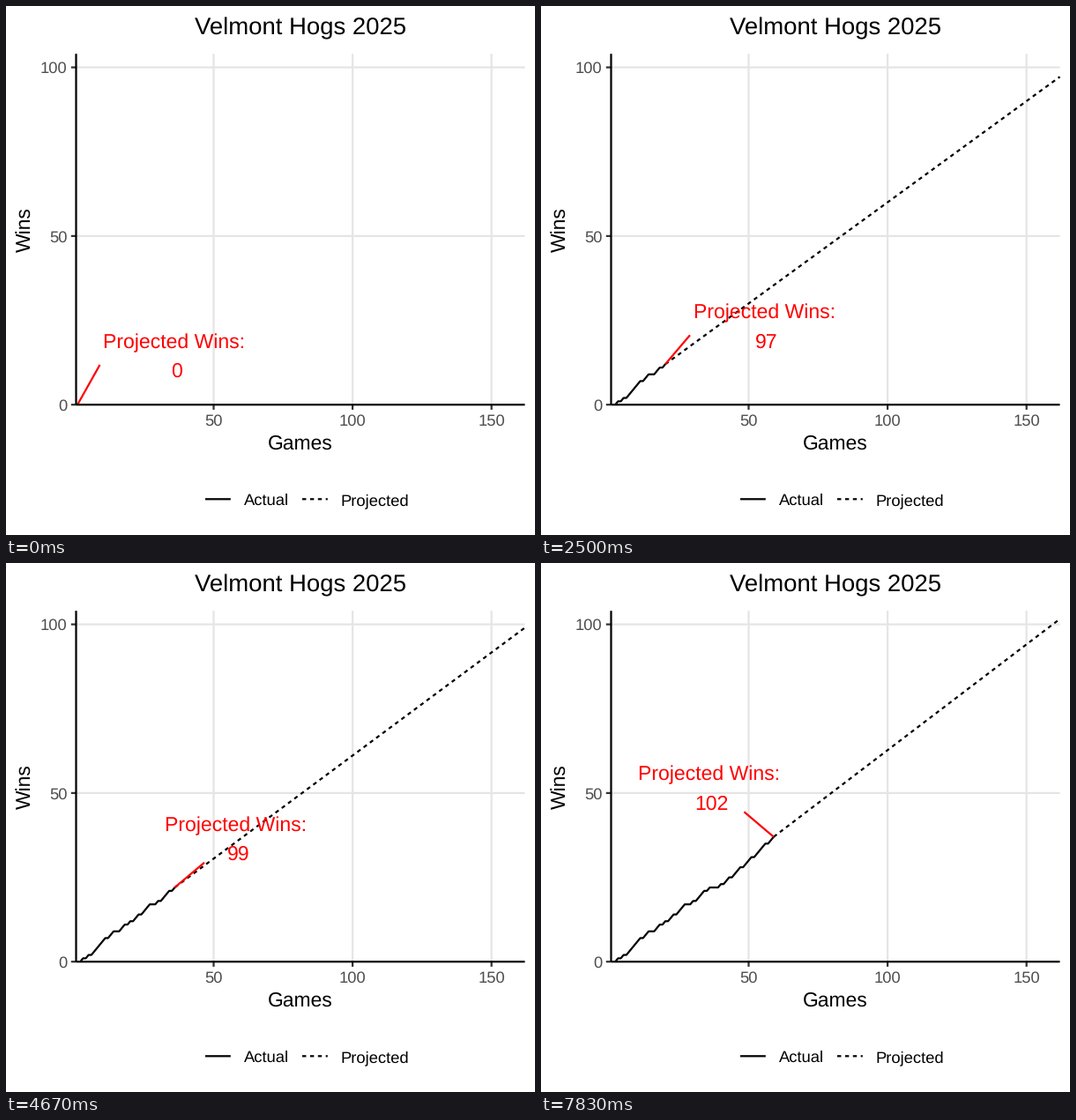
A matplotlib script for the animation above (8 s loop, 600 by 600 pixels).

```python
import numpy as np
import matplotlib.pyplot as plt
from matplotlib.animation import FuncAnimation
from matplotlib.patches import Rectangle

SIZE, DPI = 600, 150
LOOP, TICK, STEPS = 8000, 20, 48
LEFT, RIGHT, TOP, BOTTOM = 79.5, 588.5, 54.2, 452.2
LINE = 1.067
RED = "#FF0000"
SEASON = 162
LOSSES = [1, 2, 4, 6, 12, 15, 16, 19, 21, 24, 28, 29, 31, 35, 37, 38, 39,
          41, 44, 48, 52, 57]
GAMES = np.arange(1, 60)
WINS = np.cumsum(~np.isin(GAMES, LOSSES))

plt.rcParams.update({"font.family": "Liberation Sans", "text.hinting": "none",
                     "path.snap": False})


def px(game):
    return LEFT + (game - 0.5) * (RIGHT - LEFT) / 161.5


def py(wins):
    return BOTTOM - wins * 3.826


fig = plt.figure(figsize=(SIZE / DPI, SIZE / DPI), dpi=DPI, facecolor="white")
ax = fig.add_axes([0, 0, 1, 1])
ax.set(xlim=(0, SIZE), ylim=(SIZE, 0))
ax.axis("off")
panel = Rectangle((LEFT, TOP), RIGHT - LEFT, BOTTOM - TOP - 1, fill=False,
                  lw=0)
ax.add_patch(panel)


def stroke(xs, ys, color="black", z=2, style="-", clip=False):
    line, = ax.plot(xs, ys, color=color, lw=LINE, ls=style, zorder=z,
                    solid_capstyle="butt", dash_capstyle="butt",
                    solid_joinstyle="round")
    if clip:
        line.set_clip_path(panel)
    return line


def label(x, y, text, size, color="black", ha="center", **kw):
    return ax.text(x, y, text, fontsize=size, color=color, ha=ha,
                   va="baseline", zorder=6, **kw)


def draw_chart():
    for game in (50, 100, 150):
        x = px(game)
        stroke([x, x], [TOP, BOTTOM], "#E5E5E5", 1)
        stroke([x, x], [BOTTOM, BOTTOM + 5.7], "#333333")
        label(x, 475.5, str(game), 8.8, "#4D4D4D")
    for wins in (0, 50, 100):
        y = py(wins)
        if wins:
            stroke([LEFT, RIGHT], [y, y], "#E5E5E5", 1)
        stroke([LEFT - 5.7, LEFT], [y, y], "#333333")
        label(69.3, y + 6.5, str(wins), 8.8, "#4D4D4D", "right")
    stroke([LEFT, RIGHT], [BOTTOM, BOTTOM], z=5)
    stroke([LEFT, LEFT], [BOTTOM, TOP], z=5)

    label(334, 32, "Velmont Hogs 2025", 13.2)
    label(334, 502.3, "Games", 11)
    label(27.7, 253.2, "Wins", 11, rotation=90, rotation_mode="anchor")

    stroke([226, 254.8], [559.3, 559.3])
    stroke([336, 364.8], [559.3, 559.3], style=(0, (2, 2)))
    label(269.5, 566, "Actual", 8.8, ha="left")
    label(379, 566, "Projected", 8.8, ha="left")


draw_chart()
actual = stroke([], [], z=3, clip=True)
projected = stroke([], [], z=3, style=(0, (2, 2)), clip=True)
pointer = stroke([], [], RED, 4)
caption = label(0, 0, "Projected Wins:", 11.04, RED)
count = label(0, 0, "", 11.04, RED)


def label_center(i, x, y):
    """The caption trails to the right of the tip, then stays at the left."""
    if i > 28:
        return 193, y - 55.9
    dx = np.interp(i, [0, 7, 15, 24, 28], [112.4, 110.7, 115, 91.6, 72])
    dy = np.interp(i, [0, 12, 15, 18], [55.7, 55.7, 43.3, 55.8])
    return x + dx, y - dy


def pointer_end(x, y, cx, cy):
    """Nearest edge of the caption box, pulled towards that edge's middle."""
    left, low = cx - 87, cy + 27.5
    if x < left:
        near = np.hypot(left - x, y - low)
        far = np.hypot(left - x, y - cy)
        return left, low + (cy - low) * near / far
    return x + (cx - x) * 38 / np.hypot(38, cx - x), low


def update(tick):
    # Steps begin on a rounded clock, so look slightly ahead.
    i = int((tick * TICK + 14) * STEPS / LOOP) % STEPS
    game = int(round(1 + i * 1.235))
    wins = WINS[game - 1]
    total = wins / game * SEASON
    x, y = px(game), py(wins)

    actual.set_data(px(GAMES[:game]), py(WINS[:game]))
    projected.set_data([x, px(SEASON)], [y, py(total)])

    cx, cy = label_center(i, x, y)
    ex, ey = pointer_end(x, y, cx, cy)
    pointer.set_data([x, ex], [y, ey])
    caption.set_position((cx - 2.8, cy - 8.4))
    count.set_position((cx, cy + 24.7))
    count.set_text(str(int(round(total))))
    return actual, projected, pointer, caption, count


anim = FuncAnimation(fig, update, frames=LOOP // TICK, interval=TICK,
                     repeat=True, repeat_delay=0, blit=False)
plt.show()
```
